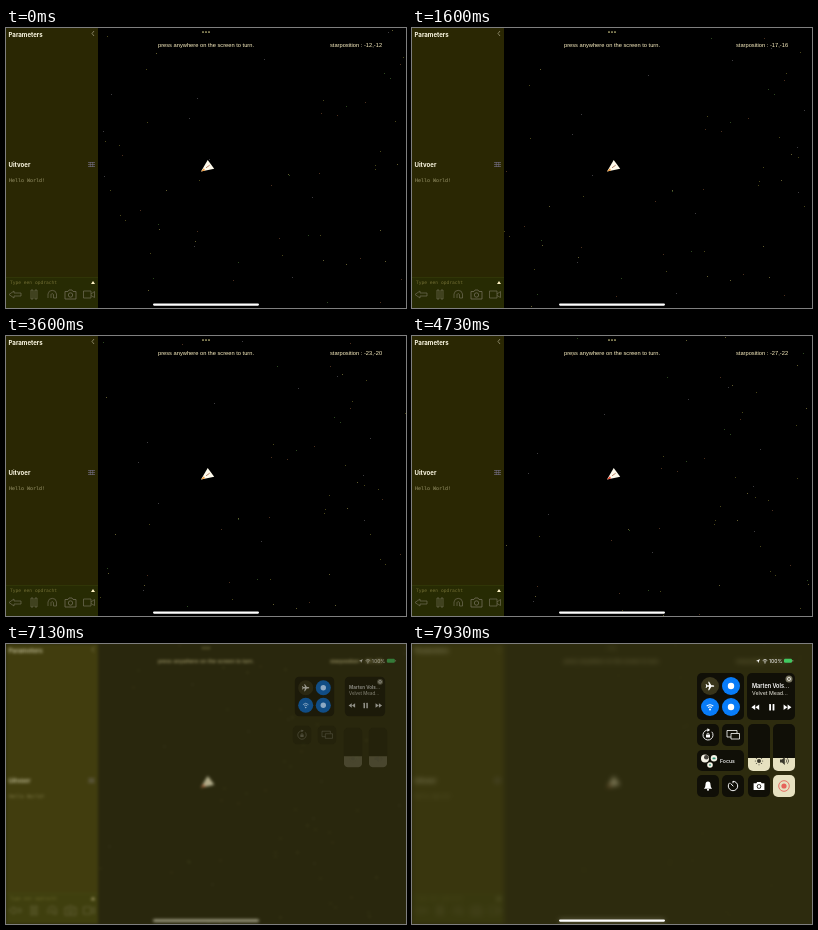
These frames come from a looping animation (400 by 280 pixels, 7.99 s). An HTML page with a canvas:

```html
<!DOCTYPE html>
<html lang="nl">
<head>
<meta charset="utf-8">
<title>Space turn</title>
<style>
html, body { margin: 0; width: 100%; height: 100%; overflow: hidden; background: #000; }
canvas { display: block; width: 400px; height: 280px; }
</style>
</head>
<body>
<canvas id="stage" width="400" height="280"></canvas>
<script>
const LOOP = 7990, STEP = 1000 / 15;
const stage = document.getElementById('stage').getContext('2d');
const buffer = document.createElement('canvas');
buffer.width = 400;
buffer.height = 280;
const scene = buffer.getContext('2d');
let c = scene;

const SANS = '"Liberation Sans", Arial, sans-serif';
const UI = 'Inter, Roboto, sans-serif';
const MONO = '"DejaVu Sans Mono", monospace';
const PALE = '#fff3c4', BLUE = '#087cf8', TILE = '#100f07', CREAM = '#e6e1c0';

const clamp = v => Math.max(0, Math.min(1, v));
const ramp = (t, a, b) => {
  const u = clamp((t - a) / (b - a));
  return u * u * (3 - 2 * u);
};
const wrap = (v, n) => ((v % n) + n) % n;

let seed = 41;
const rnd = () => (seed = seed * 16807 % 2147483647) / 2147483647;
const starTints = ['#4a471a', '#4d301e', '#2d4820', '#3e3d40', '#625d30'];
const stars = Array.from({ length: 66 }, () => ({
  x: rnd() * 310, y: rnd() * 280, tint: starTints[Math.floor(rnd() * 5)]
}));

function rect(x, y, w, h, fill, r = 0) {
  c.fillStyle = fill;
  c.beginPath();
  c.roundRect(x, y, w, h, r);
  c.fill();
}
function disc(x, y, r, fill) {
  c.fillStyle = fill;
  c.beginPath();
  c.arc(x, y, r, 0, 7);
  c.fill();
}
function ring(x, y, r, color, w = 1, a = 0, b = Math.PI * 2) {
  c.strokeStyle = color;
  c.lineWidth = w;
  c.beginPath();
  c.arc(x, y, r, a, b);
  c.stroke();
}
function fill(d, color) {
  c.fillStyle = color;
  c.fill(new Path2D(d));
}
function line(d, color, w = 0.8) {
  c.strokeStyle = color;
  c.lineWidth = w;
  c.stroke(new Path2D(d));
}
function text(s, x, y, font, color, align = 'left') {
  c.font = font;
  c.fillStyle = color;
  c.textAlign = align;
  c.fillText(s, x, y);
}
function scaled(x, y, k, draw) {
  c.save();
  c.translate(x, y);
  c.scale(k, k);
  c.translate(-x, -y);
  draw();
  c.restore();
}
const homeBar = () => rect(147, 275.5, 106, 2.2, '#fff', 1.1);

function sidebar() {
  rect(0, 0, 92, 280, '#2a2703');
  rect(0, 249, 92, 31, '#272b03');
  rect(0, 249, 92, 0.6, '#3a400c');
  text('Parameters', 2.5, 9, `bold 6.1px ${UI}`, '#fffbe6');
  line('M88 3 L86 5.5 L88 8', '#aaa487', 0.7);
  text('Uitvoer', 2.5, 138.6, `bold 6.1px ${UI}`, '#fffbe6');
  line('M82 134.5 H89 M82 136.5 H89 M82 138.5 H89 M84.3 134 V139 M86.7 134 V139', '#77718a', 0.6);
  text('Hello World!', 3, 154.3, `5px ${MONO}`, '#9a956a');
  text('Type een opdracht', 4, 256, `4.6px ${MONO}`, '#726e34');
  fill('M85 256 L87 253 L89 256Z', PALE);

  const icon = '#726e58';
  line('M3 266.5 L8 263 V265 H15 V268 H8 V270Z', icon, 0.7);
  line('M25 262 H27 V271 H25Z M29 262 H31 V271 H29Z', icon, 0.7);
  line('M42 270 V266 A4.3 4.3 0 0 1 50.5 266 V270 H47.5 V266.5 A1.4 1.4 0 0 0 45 266.5 V270', icon, 0.7);
  line('M59 263.5 H62 L63 262 H66 L67 263.5 H70 V271 H59Z', icon);
  ring(64.5, 267, 2.2, icon, 0.8);
  line('M77.5 263 H85 V270 H77.5Z M85 266 L88.5 263.5 V269.5 L85 267.5', icon, 0.7);
}

function drawScene(t, i) {
  const s = t / 1000;
  c = scene;
  rect(0, 0, 400, 280, '#000');
  for (const p of stars)
    rect(91 + Math.round(wrap(p.x - 14 * s, 310)), Math.round(wrap(p.y + 10 * s, 280)), 1, 1, p.tint);
  sidebar();

  text('press anywhere on the screen to turn.', 200, 18.5, `5.72px ${SANS}`, PALE, 'center');
  const x = Math.round(-12 - 3.1 * s), y = Math.round(-12 - 2.2 * s);
  text(`starposition : ${x},${y}`, 350, 18.5, `5.72px ${SANS}`, PALE, 'center');
  for (const dx of [-3, 0, 3]) disc(200 + dx, 4, 0.85, '#d9d28d');

  fill('M201.7 132 L208.2 140.8 L195 143.5Z', '#fffbed');
  fill('M195 143.5 L198 140.3 L199 142.6Z', i % 2 ? '#e73c22' : '#ef9838');
  line('M200 139.8 L203.7 137.2', '#a5684c', 0.8);
  homeBar();
}

// Each control grows about its own centre.
function tile(x, y, w, h, alpha, scale, draw, color = TILE) {
  if (alpha <= 0) return;
  c.globalAlpha = alpha;
  scaled(x + w / 2, y + h / 2, scale, () => {
    rect(x, y, w, h, color, 5);
    draw();
  });
}

function wifi(x, y, k, color) {
  disc(x, y, 0.9 * k, color);
  for (const r of [2.4, 4.3]) ring(x, y, r * k, color, 0.95 * k, -2.35, -0.79);
}

function plane() {
  fill('M303 42 Q303 41 301.5 41 H299.6 L297 37 H295.8 L297 41 H294.7 L293.7 39.6 H292.9 L293.5 42 L292.9 44.4 H293.7 L294.7 43 H297 L295.8 47 H297 L299.6 43 H301.5 Q303 43 303 42Z', '#fff');
}

function connections() {
  disc(298, 42, 9, '#39351b');
  for (const [x, y] of [[319, 42], [298, 63], [319, 63]]) disc(x, y, 9, BLUE);
  scaled(298, 42, 0.85, plane);
  disc(319, 42, 3.2, '#fff');
  wifi(298, 65.6, 1.1, '#fff');
  disc(319, 63, 3.2, '#fff');
}

function player() {
  text('Marten Vols...', 340, 44, `600 5.5px ${UI}`, '#fff');
  text('Velvet Mead...', 340, 50.7, `5.3px ${UI}`, '#efede2');
  disc(377, 35, 3.5, '#77745f');
  ring(377, 35, 1.6, '#fff', 0.7);
  fill('M343.2 60.5 V66 L339.4 63.2Z M347.2 60.5 V66 L343.4 63.2Z', '#fff');
  rect(357.2, 60, 1.8, 6.6, '#fff', 0.5);
  rect(360.6, 60, 1.8, 6.6, '#fff', 0.5);
  fill('M371.6 60.5 V66 L375.4 63.2Z M375.6 60.5 V66 L379.4 63.2Z', '#fff');
}

function rotation() {
  ring(296, 91, 5, '#fff', 0.9, -0.7, 4.8);
  fill('M295.4 84.3 L298.2 86 L295.4 87.7Z', '#fff');
  rect(294, 90.5, 4, 3, '#fff', 0.6);
  ring(296, 90.4, 1.2, '#fff', 0.7, Math.PI);
}

function mirroring() {
  line('M319 93 H315 V86.5 H325 V89', '#fff', 0.8);
  line('M319 89.5 H327.5 V95 H319Z', '#fff', 0.8);
}

function slider(x, draw) {
  c.save();
  c.beginPath();
  c.roundRect(x, 80, 22, 47, 5);
  c.clip();
  rect(x, 114, 22, 14, CREAM);
  draw();
  c.restore();
}

function sun() {
  disc(347, 117, 2, '#38362a');
  for (let k = 0; k < 8; k++) {
    const a = k * Math.PI / 4;
    disc(347 + 3.7 * Math.cos(a), 117 + 3.7 * Math.sin(a), 0.5, '#38362a');
  }
}

function speaker() {
  fill('M368 115.5 H370 L372.8 113 V121 L370 118.5 H368Z', '#38362a');
  ring(372.5, 117, 2.2, '#38362a', 0.7, -0.8, 0.8);
  ring(372.5, 117, 4, '#38362a', 0.7, -0.8, 0.8);
}

function focus() {
  disc(293, 114.5, 4, '#f4f2e5');
  disc(294.3, 113.3, 2.3, '#45423b');
  disc(302, 114.3, 3.2, '#f4f2e5');
  rect(300.5, 113.5, 3, 1.7, '#309778', 0.5);
  disc(298, 121, 2.8, '#f4f2e5');
  disc(298, 121, 1.1, '#55a287');
  text('Focus', 308, 118.5, `500 5.2px ${UI}`, '#fff');
}

function bell() {
  fill('M291.5 145 Q293.2 143.5 293.2 140.5 Q293.3 137 296 137 Q298.7 137 298.8 140.5 Q298.8 143.5 300.5 145Z', '#fff');
  disc(296, 146.2, 1.2, '#fff');
}

function timer() {
  ring(321, 142, 4.7, '#fff', 0.95, -1.57, 3.9);
  line('M321 137 V139.2 M318.6 139.4 L321.3 142.3', '#fff', 1);
}

function camera() {
  fill('M341 139 H344 L345 137.5 H349 L350 139 H353 V146.5 H341Z', '#fff');
  disc(347, 142.5, 2.5, TILE);
  disc(347, 142.5, 1.6, '#fff');
}

function recorder() {
  ring(372, 142, 5.3, '#e6625a', 0.9);
  disc(372, 142, 2.6, '#e6625a');
}

function statusBar(alpha, dx) {
  c.save();
  c.globalAlpha = alpha;
  c.translate(dx, 0);
  fill('M344 17 L348 15 L346.2 19 L345.8 17.3Z', '#fff');
  wifi(353, 18.8, 0.75, '#fff');
  text('100%', 357, 18.7, `5.1px ${UI}`, '#fff');
  rect(372, 14.8, 8, 4, '#41c961', 1.2);
  rect(380.5, 16, 0.7, 1.6, '#a9b79a');
  c.restore();
}

function controls(q) {
  const scale = 0.78 + 0.22 * q;
  const shown = row => clamp(q * 2 - row * 0.33);
  const add = (row, x, y, w, h, draw, color) =>
    tile(x, y, w, h, shown(row), scale, draw, color);
  add(0, 285, 29, 47, 47, connections);
  add(0, 335, 29, 48, 47, player);
  add(1, 285, 80, 22, 22, rotation);
  add(1, 310, 80, 22, 22, mirroring);
  add(1, 336, 80, 22, 47, () => slider(336, sun));
  add(1, 361, 80, 22, 47, () => slider(361, speaker));
  add(2, 285, 106, 47, 21, focus);
  add(3, 285, 131, 22, 22, () => scaled(296, 142, 0.9, bell));
  add(3, 310, 131, 22, 22, timer);
  add(3, 336, 131, 22, 22, () => scaled(347, 142, 0.9, camera));
  add(3, 361, 131, 22, 22, recorder, CREAM);
  statusBar(shown(0), 12 * (1 - q));
  c.globalAlpha = shown(3);
  homeBar();
  c.globalAlpha = 1;
}

// The scene blurs and dims while an olive haze is added over it.
function haze(k) {
  c.filter = k ? `blur(${2.4 * k}px)` : 'none';
  c.globalAlpha = 1 - 0.7 * k;
  c.drawImage(buffer, 0, 0);
  c.filter = 'none';
  c.globalCompositeOperation = 'lighter';
  c.globalAlpha = Math.min(1, 1.5 * k);
  rect(0, 0, 400, 280, '#2d2b0e');
  c.globalCompositeOperation = 'source-over';
  c.globalAlpha = 1;
}

function frame(now) {
  const i = Math.floor((now % LOOP + 4) / STEP) % 120;
  const t = i * STEP;
  drawScene(t, i);
  c = stage;
  rect(0, 0, 400, 280, '#000');
  haze(ramp(t, 6650, 7500));
  controls(ramp(t, 6984, 7430));
  requestAnimationFrame(frame);
}
requestAnimationFrame(frame);
</script>
</body>
</html>
```
